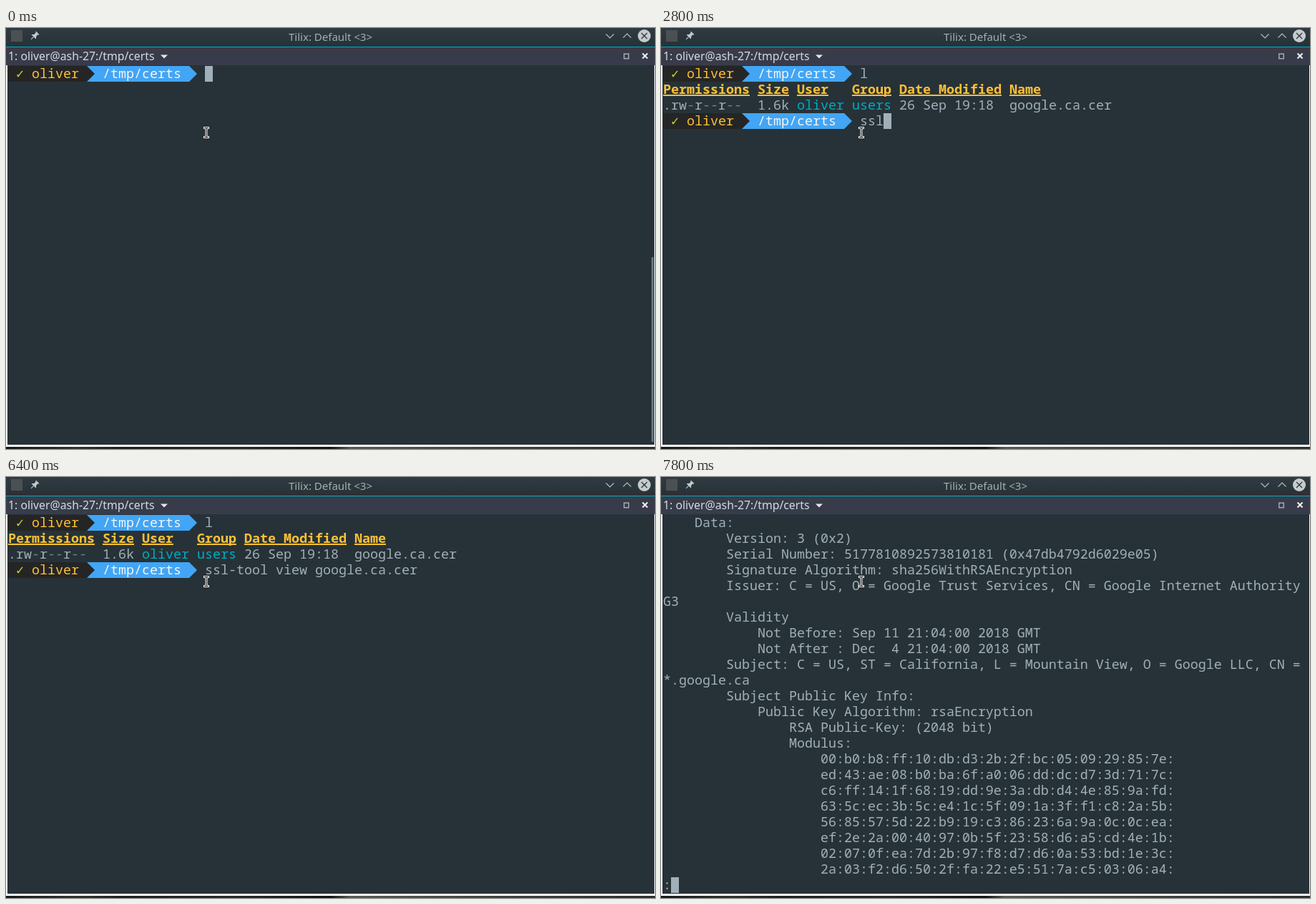
These frames come from a looping animation (907x588 px, 8 s). An HTML page:

```html
<!DOCTYPE html>
<html lang="en">
<head>
<meta charset="utf-8">
<title>Terminal</title>
<style>
  @property --col { syntax: "<integer>"; inherits: true; initial-value: 25; }
  @property --row { syntax: "<integer>"; inherits: true; initial-value: 0; }

  html, body { margin: 0; width: 100%; height: 100%; overflow: hidden; background: #263238; }
  .stage { position: relative; width: 907px; height: 588px; overflow: hidden; background: #263238; }
  :where(.stage) :where(div, pre, svg) { position: absolute; left: 0; top: 0; margin: 0; white-space: pre; }

  /* window frame */
  .title {
    width: 907px; height: 26px; text-align: center;
    font: 15px/24px "Noto Sans", sans-serif; color: #a5afb3;
    background: linear-gradient(#303b41, #263238);
  }
  .tab {
    top: 26px; width: 904px; height: 25px; padding-left: 3px;
    border-top: 1px solid #00acc1; background: #383c4a;
    font: 15.8px/25px "Noto Sans", sans-serif; color: #d3dae3;
  }
  .edge { top: 27px; width: 903.5px; height: 555px; border: solid #fcfcfc; border-width: 0 1.5px 3px 2px; }
  .desk {
    top: 585px; width: 907px; height: 3px;
    background: linear-gradient(90deg, #15191a, #30342f 11%, #1b1f1f 18%, #252a28 35%, #111414 50%, #555a54 53%, #3c423e 75%, #2a302e);
  }
  .thumb {
    left: 902px; top: 320px; width: 3px; height: 258px; background: #68747c; border-radius: 1px;
    animation: thumb 8s step-end infinite;
  }

  /* character grid: 11 x 22 px */
  .term {
    left: 3px; top: 53px; width: 899px; height: 528px; color: #a1b0b8;
    font: 18.333px/20px "Noto Sans Mono", "DejaVu Sans Mono", monospace;
    font-variant-ligatures: none;
    animation: caret 8s step-end infinite;
  }
  .path {
    left: 110px; width: 132px; height: 22px; padding-left: 22px; color: #f5f5f5; background: #42a5f5;
    clip-path: polygon(0 0, 143px 0, 154px 11px, 143px 22px, 0 22px);
  }
  .user {
    width: 121px; height: 22px; color: #ffc135; background: #252525;
    clip-path: polygon(0 0, 110px 0, 121px 11px, 110px 22px, 0 22px);
  }
  .user i { display: inline-block; width: 11px; margin: 0 11px; font-style: normal; color: #c3d82c; }
  .cmd { left: 275px; }
  .typed { overflow: hidden; height: 22px; width: calc((var(--col) - 25) * 11px); }
  .cursor {
    width: 11px; height: 22px; background: #a1b0b8;
    transform: translate(calc(var(--col) * 11px), calc(var(--row) * 22px));
    animation: blink 8s step-end infinite;
  }
  u {
    font-weight: 700; color: #ffc135; text-decoration-thickness: 2px;
    text-underline-offset: 1px; text-decoration-skip-ink: none;
  }
  .own { color: #00acc1; }
  .dim { color: #708284; }

  .shell { animation: leave 8s step-end infinite; }
  .ran { animation: show-cmd 8s step-end infinite; }
  .list { top: 22px; animation: show-list 8s step-end infinite; }
  .entry { top: 22px; }
  .next { top: 66px; animation: show-next 8s step-end infinite; }
  .pager { animation: show-pager 8s step-end infinite; }
  .clip { width: 899px; height: 506px; overflow: hidden; }
  .clip pre { top: -1px; font: inherit; line-height: 22px; animation: scroll 8s step-end infinite; }
  .status { top: 506px; }

  @keyframes caret {
    0% { --col: 25; --row: 0; }
    7.5% { --col: 26; --row: 0; }
    10% { --col: 0; --row: 3; }
    12.5% { --col: 25; --row: 3; }
    35% { --col: 28; --row: 3; }
    40% { --col: 29; --row: 3; }
    42.5% { --col: 30; --row: 3; }
    45% { --col: 34; --row: 3; }
    50% { --col: 35; --row: 3; }
    52.5% { --col: 36; --row: 3; }
    55% { --col: 38; --row: 3; }
    57.5% { --col: 39; --row: 3; }
    60% { --col: 41; --row: 3; }
    62.5% { --col: 42; --row: 3; }
    65% { --col: 43; --row: 3; }
    72.5% { --col: 53; --row: 3; }
    87.5%, 100% { --col: 1; --row: 23; }
  }
  @keyframes blink {
    0%, 25%, 87.5%, 97.5%, 100% { opacity: 1; }
    20%, 80%, 95% { opacity: 0; }
  }
  @keyframes thumb {
    0% { opacity: 1; clip-path: inset(0); }
    10% { opacity: 1; clip-path: inset(1px 0 0); }
    17.5%, 100% { opacity: 0; clip-path: inset(1px 0 0); }
  }
  @keyframes show-cmd { 0% { opacity: 0; } 7.5%, 100% { opacity: 1; } }
  @keyframes show-list { 0% { opacity: 0; } 10%, 100% { opacity: 1; } }
  @keyframes show-next { 0% { opacity: 0; } 12.5%, 100% { opacity: 1; } }
  @keyframes show-pager { 0% { opacity: 0; } 87.5%, 100% { opacity: 1; } }
  @keyframes leave { 0% { opacity: 1; } 87.5%, 100% { opacity: 0; } }
  @keyframes scroll { 0% { transform: none; } 97.5%, 100% { transform: translateY(-22px); } }
</style>
</head>
<body>
<div class="stage">
  <div class="edge"></div>
  <div class="desk"></div>
  <div class="title">Tilix: Default &lt;3&gt;</div>
  <div class="tab">1: oliver@ash-27:/tmp/certs</div>
  <div class="thumb"></div>

  <div class="term">
    <div class="shell">
      <div class="prompt">
        <div class="path">/tmp/certs</div>
        <div class="user"><i>✓</i>oliver</div>
        <div class="cmd ran">l</div>
      </div>
      <div class="list">
        <div><u>Permissions</u> <u>Size</u> <u>User</u>   <u>Group</u> <u>Date Modified</u> <u>Name</u></div>
        <div class="entry">.rw<span class="dim">-</span>r<span class="dim">--</span>r<span class="dim">--</span>  1.6k <span class="own">oliver</span> <span class="own">users</span> 26 Sep 19:18  google.ca.cer</div>
      </div>
      <div class="prompt next">
        <div class="path">/tmp/certs</div>
        <div class="user"><i>✓</i>oliver</div>
        <div class="cmd typed">ssl-tool view google.ca.cer</div>
      </div>
    </div>
    <div class="pager">
      <div class="clip"><pre>Certificate:
    Data:
        Version: 3 (0x2)
        Serial Number: 5177810892573810181 (0x47db4792d6029e05)
        Signature Algorithm: sha256WithRSAEncryption
        Issuer: C = US, O = Google Trust Services, CN = Google Internet Authority
G3
        Validity
            Not Before: Sep 11 21:04:00 2018 GMT
            Not After : Dec  4 21:04:00 2018 GMT
        Subject: C = US, ST = California, L = Mountain View, O = Google LLC, CN =
*.google.ca
        Subject Public Key Info:
            Public Key Algorithm: rsaEncryption
                RSA Public-Key: (2048 bit)
                Modulus:
                    00:b0:b8:ff:10:db:d3:2b:2f:bc:05:09:29:85:7e:
                    ed:43:ae:08:b0:ba:6f:a0:06:dd:dc:d7:3d:71:7c:
                    c6:ff:14:1f:68:19:dd:9e:3a:db:d4:4e:85:9a:fd:
                    63:5c:ec:3b:5c:e4:1c:5f:09:1a:3f:f1:c8:2a:5b:
                    56:85:57:5d:22:b9:19:c3:86:23:6a:9a:0c:0c:ea:
                    ef:2e:2a:00:40:97:0b:5f:23:58:d6:a5:cd:4e:1b:
                    02:07:0f:ea:7d:2b:97:f8:d7:d6:0a:53:bd:1e:3c:
                    2a:03:f2:d6:50:2f:fa:22:e5:51:7a:c5:03:06:a4:</pre></div>
      <div class="status">:</div>
    </div>
    <div class="cursor"></div>
  </div>

  <svg width="907" height="588" fill="none">
    <rect x="7" y="3" width="16" height="16" fill="#4b5152"/>
    <g transform="translate(40 11) rotate(45)" fill="#c3cacd">
      <path d="M-3-6H3V-4.500H2V-1L4 1V2H-4V1L-2-1V-4.500H-3Z"/>
      <path d="M0 2V7" stroke="#c3cacd"/>
    </g>
    <path d="M838.500 8.500L844 14L849.500 8.500M862.500 13.500L868 8L873.500 13.500" stroke="#b4bdc1" stroke-width="1.200"/>
    <circle cx="892" cy="11" r="9" fill="#c6cbcd"/>
    <path d="M888 7L896 15M896 7L888 15" stroke="#2a353a" stroke-width="1.300"/>
    <path d="M216 37.500H226L221 42.500Z" fill="#e3e7ec"/>
    <rect x="863.750" y="36.250" width="6.500" height="6.500" stroke="#a4a8b3" stroke-width="1.500"/>
    <path d="M889.500 35.500L896.500 42.500M896.500 35.500L889.500 42.500" stroke="#eef0f3" stroke-width="2"/>
    <g stroke-linecap="square">
      <path id="beam" d="M277.500 139.500H282.500M280 139.500V152.500M277.500 152.500H282.500" stroke="#fff" stroke-width="3"/>
      <path d="M277.500 139.500H282.500M280 139.500V152.500M277.500 152.500H282.500" stroke="#111"/>
    </g>
  </svg>
</div>
</body>
</html>
```
